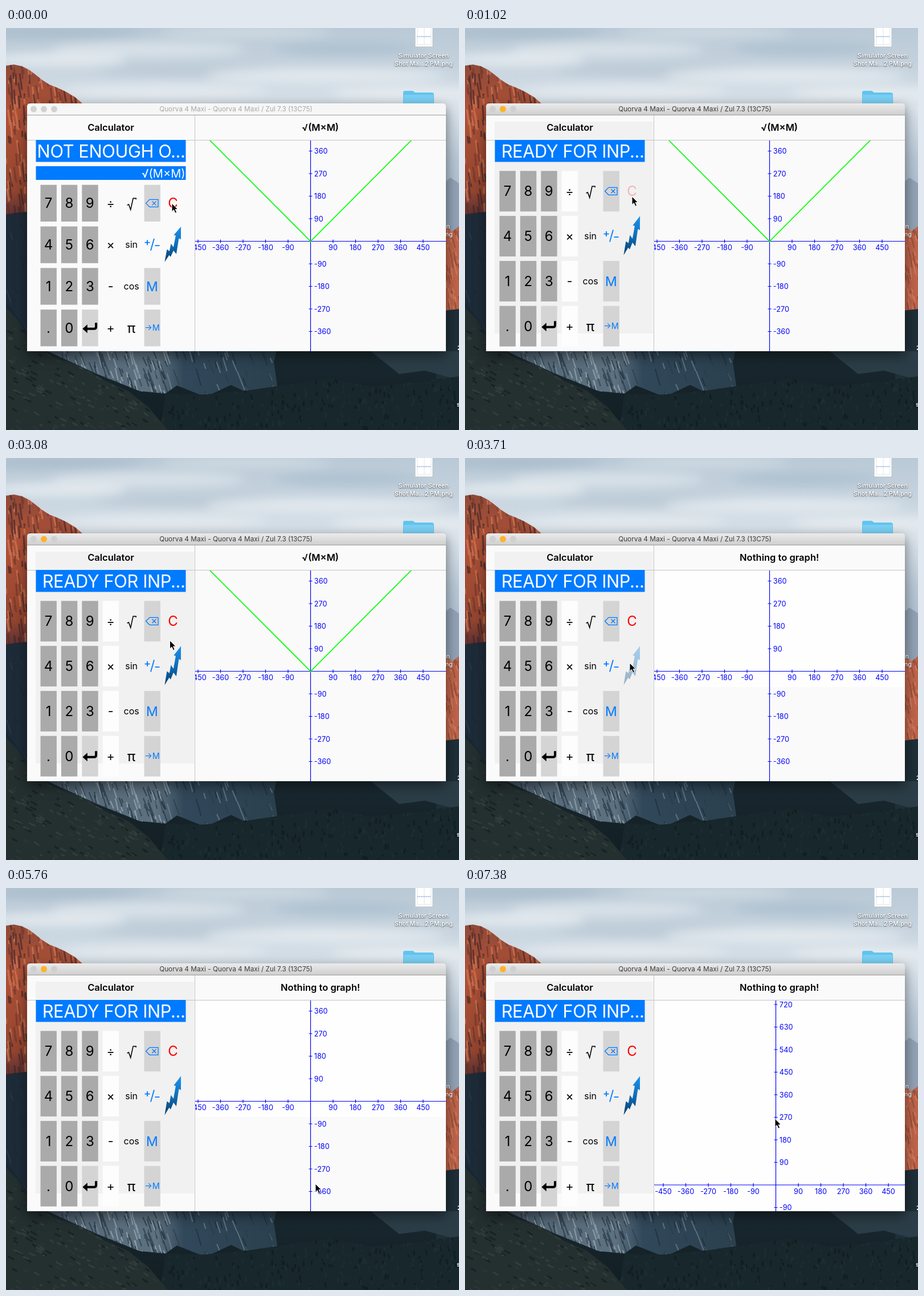
Write an HTML page that moves like this. It is 795x704 px and loops after 8 s.

```html
<!DOCTYPE html>
<html lang="en">
<head>
<meta charset="utf-8">
<title>Graphing calculator</title>
<style>
  html, body { margin: 0; width: 100%; height: 100%; overflow: hidden; background: #17242a; }
  svg { display: block; width: 795px; height: 704px; font-family: Inter, "Open Sans", sans-serif; }
  .window { filter: drop-shadow(0 7px 11px rgba(0, 0, 0, .5)); }
  .desk { fill: #fff; font-size: 10.7px; font-weight: 600; filter: drop-shadow(0 1px 1px rgba(0, 0, 0, .7)); }
  .head { font-size: 16.5px; font-weight: 600; text-anchor: middle; }
  .axis { stroke: #00f; stroke-width: 1.2; fill: none; }
  .ticks { fill: #00f; font-size: 12.7px; }
</style>
</head>
<body>
<svg viewBox="0 0 795 704">
  <defs>
    <linearGradient id="sky" x2="0" y2="1">
      <stop offset="0" stop-color="#b9c9d6"/><stop offset=".1" stop-color="#c6d3de"/>
      <stop offset=".2" stop-color="#dbe4eb"/><stop offset=".32" stop-color="#b9c8d6"/>
      <stop offset=".5" stop-color="#a3b3c5"/>
    </linearGradient>
    <linearGradient id="rock" x2="0" y2="1">
      <stop offset="0" stop-color="#8f4937"/><stop offset=".3" stop-color="#b05238"/>
      <stop offset=".8" stop-color="#94452f"/><stop offset="1" stop-color="#4a2c34"/>
    </linearGradient>
    <linearGradient id="valley" x2="0" y2="1">
      <stop offset="0" stop-color="#20313d"/><stop offset=".6" stop-color="#1b2b32"/>
      <stop offset="1" stop-color="#111d22"/>
    </linearGradient>
    <linearGradient id="cliff">
      <stop offset="0" stop-color="#2c3c49"/><stop offset=".3" stop-color="#566978"/>
      <stop offset=".55" stop-color="#5d7180"/><stop offset=".65" stop-color="#31485a"/>
      <stop offset="1" stop-color="#2a404e"/>
    </linearGradient>
    <linearGradient id="bar" x2="0" y2="1">
      <stop offset="0" stop-color="#ebebeb"/><stop offset="1" stop-color="#cfcfcf"/>
    </linearGradient>
    <linearGradient id="blue" x2="0" y2="1">
      <stop offset="0" stop-color="#1b92ee"/><stop offset=".5" stop-color="#0f6fba"/>
      <stop offset="1" stop-color="#0a3d68"/>
    </linearGradient>
    <filter id="soft" x="-30%" y="-80%" width="160%" height="260%"><feGaussianBlur stdDeviation="9"/></filter>
    <clipPath id="peakClip"><path id="peak" d="M0 66L14 64 28 67 40 73 51 81 62 90 76 99 91 105 106 112 121 121 135 133H184V340H0Z"/></clipPath>
    <clipPath id="cliffClip"><path id="cliffs" d="M0 330L50 320V540L480 540 470 585 478 640 430 642 395 625 350 646 300 626 280 640 235 636 160 606 60 560 0 480Z"/></clipPath>
    <clipPath id="ridgeClip"><path id="ridge" d="M0 490L20 510 40 546 92 580 130 592 174 618 215 636 250 664 284 704H0Z"/></clipPath>
    <clipPath id="woodClip"><path id="wood" d="M280 640L345 642 430 634 510 622 570 614 640 628 700 622 795 610V704H270Z"/></clipPath>
    <clipPath id="eastClip"><path id="east" d="M760 362L774 350 784 356 795 347V492L760 496Z"/></clipPath>
    <clipPath id="plotClip"><rect x="332" y="197" width="440" height="369"/></clipPath>
    <clipPath id="frameClip"><path d="M37 566V138q0-6 6-6H766q6 0 6 6V566Z"/></clipPath>
  </defs>

  <rect width="795" height="704" fill="url(#sky)"/>
  <g filter="url(#soft)">
    <ellipse cx="90" cy="8" rx="150" ry="9" fill="#a9bbca"/>
    <ellipse cx="420" cy="8" rx="150" ry="9" fill="#d0dbe3"/>
    <ellipse cx="250" cy="38" rx="170" ry="13" fill="#d8e1e8"/>
    <ellipse cx="600" cy="36" rx="130" ry="11" fill="#aec1d0"/>
    <ellipse cx="330" cy="74" rx="170" ry="9" fill="#bccad6"/>
    <ellipse cx="90" cy="56" rx="120" ry="12" fill="#e2e9ee"/>
    <ellipse cx="560" cy="84" rx="210" ry="13" fill="#e2e9ee"/>
    <ellipse cx="280" cy="112" rx="180" ry="12" fill="#e3e9ee"/>
    <ellipse cx="720" cy="116" rx="150" ry="12" fill="#e6ecf0"/>
  </g>
  <path d="M755 282L780 262 795 272V370H755Z" fill="#92a2b5"/>
  <path d="M0 320L60 300V540H795V704H0Z" fill="url(#valley)"/>
  <path d="M755 490L795 488V704H755Z" fill="#1f2f38"/>
  <path d="M640 566H795V616L735 600 690 606Z" fill="#2b3d47"/>
  <use href="#peak" fill="url(#rock)"/><g id="peakMarks" clip-path="url(#peakClip)"></g>
  <use href="#east" fill="#c0644a"/><g id="eastMarks" clip-path="url(#eastClip)"></g>
  <use href="#cliffs" fill="url(#cliff)"/><g id="cliffMarks" clip-path="url(#cliffClip)"></g>
  <path d="M0 326L50 320V540L0 490Z" fill="#172532" opacity=".75"/>
  <use href="#wood" fill="#18272b"/><g id="woodMarks" clip-path="url(#woodClip)"></g>
  <use href="#ridge" fill="#242f30"/><g id="ridgeMarks" clip-path="url(#ridgeClip)"></g>

  <path d="M718 0V33H749V0" fill="#fff" stroke="#b9c0c6"/>
  <path d="M722 0V29H746V0M734 0V29" fill="none" stroke="#e0e4e8"/>
  <path d="M722 15H746" stroke="#4a86d8" stroke-dasharray="2 1"/>
  <path d="M697 135V113q0-3 3-3H714l4 3H747q4 0 4 4V135Z" fill="#62c5ef"/>
  <path d="M698 117H750V135H698Z" fill="#7bd2f6"/>
  <g class="desk">
    <text x="733" y="52" text-anchor="middle">Simulator Screen</text>
    <text x="733" y="66" text-anchor="middle">Shot Ma...2 PM.png</text>
    <text x="779" y="351" text-anchor="end">n</text>
    <text x="784" y="365" text-anchor="end">ng</text>
    <text x="792" y="564">2</text>
    <text x="791" y="663">s</text>
  </g>

  <g class="window"><path d="M37 566V138q0-6 6-6H766q6 0 6 6V566Z" fill="#fafafa"/></g>
  <g clip-path="url(#frameClip)">
    <rect id="titleBar" x="37" y="132" width="735" height="20"/>
    <circle class="light" cx="48.5" cy="142" r="5.5"/>
    <circle id="amber" cx="66.5" cy="142" r="5.5"/>
    <circle class="light" cx="84.5" cy="142" r="5.5"/>
    <text id="title" x="403.5" y="146.3" font-size="11.8" text-anchor="middle">Quorva 4 Maxi - Quorva 4 Maxi / Zul 7.3 (13C75)</text>
    <path d="M37 152.5H772" stroke="#9c9c9c"/>
    <path id="panel" d="M52 164H285V277H330V535H52Z" fill="#f1f1f1"/>
    <path id="notch" d="M285 164H330V277H285Z" fill="#f1f1f1"/>
    <rect id="glow" x="332" y="197" width="440" fill="#fefefe"/>
    <path d="M37 196.5H772M331.5 153V566" stroke="#c4c4c4"/>
    <text class="head" x="184" y="180">Calculator</text>
    <text class="head" id="graphTitle" x="551.7" y="180"></text>
    <rect x="52.5" y="196" width="263" height="38.5" fill="#007aff"/>
    <text id="display" x="314.5" y="227" font-size="30.8" letter-spacing="-.4" fill="#fff" text-anchor="end"></text>
    <g id="formula">
      <rect x="52.5" y="242" width="263" height="24" fill="#007aff"/>
      <text x="314.5" y="261.5" font-size="20" fill="#fff" text-anchor="end">√(M×M)</text>
    </g>
    <g id="keys"></g>
    <g clip-path="url(#plotClip)">
      <g id="axes"><path class="axis" id="grid"/><g class="ticks" id="labels"></g></g>
      <path id="curve" d="M355.5 194.5L534.5 373.5 713.5 194.5" fill="none" stroke="#0f0" stroke-width="1.6"/>
    </g>
  </g>
  <path id="cursor" d="M0 0V14.5L3.4 11.4 6 17.2 8.6 16 6.1 10.5H10.6Z" fill="#000" stroke="#fff"/>
</svg>
<script>
const LOOP = 8000;
const $ = id => document.getElementById(id);

function add(parent, tag, attrs, text = "") {
  const node = document.createElementNS("http://www.w3.org/2000/svg", tag);
  for (const k in attrs) node.setAttribute(k, attrs[k]);
  node.textContent = text;
  return parent.appendChild(node);
}

// Seeded strokes give the landscape its grain.
let seed = 7;
const rand = () => (seed = seed * 16807 % 2147483647) / 2147483647;
function grain(id, count, [x, y, w, h], [dx, dy], colors, width) {
  for (const color of colors) {
    let d = "";
    for (let i = 0; i < count; i++) {
      const len = .3 + rand();
      d += `M${(x + rand() * w).toFixed(1)} ${(y + rand() * h).toFixed(1)}` +
           `l${(dx * len + rand() * 4 - 2).toFixed(1)} ${(dy * len).toFixed(1)}`;
    }
    add($(id), "path", { d, stroke: color, "stroke-width": width, opacity: .6 });
  }
}
grain("peakMarks", 90, [0, 62, 140, 270], [3, 26], ["#d9805a", "#3a2327", "#6b352c"], 3);
grain("eastMarks", 20, [772, 345, 23, 150], [3, 14], ["#e08e6c", "#7c4338"], 2);
grain("cliffMarks", 110, [0, 340, 480, 300], [9, 26], ["#7d909f", "#1b2a34", "#283947"], 2);
grain("cliffMarks", 60, [100, 560, 180, 80], [7, 22], ["#a9b5be", "#1f2e38"], 2.2);
grain("woodMarks", 190, [270, 590, 525, 114], [0, 8], ["#0e191c", "#20323a", "#1a2a30"], 3);
grain("ridgeMarks", 130, [0, 486, 300, 218], [9, 5], ["#121b1d", "#3d4944", "#303b39"], 3);

const keys = [];
function key(col, row, fill, label, size = 24, color = "#000") {
  const rect = add($("keys"), "rect", { x: 60.5 + col * 36.4, width: 28.4, fill });
  const body = add($("keys"), "g", {});
  if (label) add(body, "text", { y: size * .36, "font-size": size, fill: color, "text-anchor": "middle" }, label);
  const item = { col, row, rect, body };
  keys.push(item);
  return item;
}
const outline = (item, d, stroke, width) =>
  add(item.body, "path", { d, stroke, "stroke-width": width, fill: "none" });

const DARK = "#aaa", PALE = "#d4d4d4", BLUE = "#007aff";
["789", "456", "123", ".0"].forEach((digits, row) =>
  [...digits].forEach((digit, col) => key(col, row, DARK, digit)));
const ops = ["÷", "×", "-", "+"].map((op, row) => key(3, row, "none", op, 21.5));
key(4, 1, "none", "sin", 16);
key(4, 2, "none", "cos", 16);
key(4, 3, "none", "π", 24);
key(5, 2, PALE, "M", 23, BLUE);
key(5, 3, PALE, "→M", 14.5, BLUE);
const clear = key(6, 0, "none", "C", 24, "#f00");

outline(key(4, 0, "none"), "M-7.5 3.5L-4.8 2-1.4 11.3 3-8.6H8V-6.5", "#000", 1.6);
outline(key(5, 0, PALE), "M-11 0L-4.5-6.5H10.5V6.5H-4.5ZM0-3.5L7 3.5M7-3.5L0 3.5", BLUE, 1.3);
outline(key(5, 1, "none"), "M-13-4H-4M-8.5-8.5V.5M-2.5 10L3.5-11M5 1.5H13", BLUE, 1.8);
const enter = key(2, 3, PALE);
outline(enter, "M10.8-9V-2Q10.8 1.5 7 1.5H-6", "#000", 4);
add(enter.body, "path", { d: "M-13 1.5L-4.5-6V9Z" });
const bolt = key(6, 1, "none");
const boltShape = add(bolt.body, "path", { fill: "url(#blue)",
  d: "M14.2-32L1.5-17 5-16.5 1 4-3.5-2-6 11-10.5 8-14.5 30-6.5 18-4 21 1 10 6 16 10.5-11.5 14-9.5Z" });

const grid = $("grid"), unit = 39.5;
let d = "M-500 0H500M0-600V600";
for (let i = -8; i <= 8; i++) {
  if (!i) continue;
  const at = i * unit;
  if (Math.abs(i) < 6) {
    d += `M${at}-3V3`;
    add($("labels"), "text", { x: at, y: 15.7, "text-anchor": "middle" }, i * 90);
  }
  d += `M-3 ${-at}H3`;
  add($("labels"), "text", { x: 6.3, y: 4.6 - at }, i * 90);
}
grid.setAttribute("d", d);

// Pointer moves: start, end, steps, target x, target y
const moves = [
  [80, 80, 1, 292, 306],
  [680, 1020, 4, 293, 295],
  [1110, 1460, 5, 423, 352],
  [1570, 2110, 7, 340, 367],
  [2290, 2290, 1, 327, 324],
  [2380, 2470, 2, 287, 283],
  [2650, 3440, 10, 288, 356],
  [3530, 3530, 1, 289, 359],
  [3800, 4160, 5, 560, 334],
  [5060, 5760, 9, 543, 518],
  [6390, 6770, 5, 542, 474],
  [6950, 7030, 2, 541, 336],
  [7210, 7380, 3, 544, 404]
];
function pointer(t) {
  let x = 291, y = 307;
  for (const [start, end, steps, tx, ty] of moves) {
    if (t < start) break;
    const p = end > start ? Math.min(1, (Math.floor((t - start) / (end - start) * (steps - 1) + 1e-6) + 1) / steps) : 1;
    x += (tx - x) * p;
    y += (ty - y) * p;
  }
  return [x, y];
}

const set = (node, name, value) => node.setAttribute(name, value);
const show = (node, on) => set(node, "visibility", on ? "visible" : "hidden");
const lights = document.querySelectorAll(".light");

function render(t) {
  const active = t >= 320, ready = t >= 410, empty = t >= 3620, moved = t >= 6210;

  set($("titleBar"), "fill", active ? "url(#bar)" : "#f6f6f6");
  set($("title"), "fill", active ? "#3c3c3c" : "#a9a9a9");
  set($("amber"), "fill", active ? "#fdb32b" : "#d2d2d2");
  lights.forEach(light => set(light, "fill", active ? "#d0d0d0" : "#d2d2d2"));

  show($("panel"), ready);
  show($("notch"), ready && (t < 1460 || t >= 2650));
  show($("formula"), !ready);
  $("display").textContent = ready ? "READY FOR INP..." : "NOT ENOUGH O...";
  const top = ready ? 250.3 : 274.7, step = ready ? 78.8 : 72.8, height = ready ? 71 : 64.3;
  for (const { col, row, rect, body } of keys) {
    const y = top + row * step;
    set(rect, "y", y);
    set(rect, "height", height);
    set(body, "transform", `translate(${74.5 + col * 36.4} ${y + height / 2})`);
  }
  ops.forEach(op => set(op.rect, "fill", ready ? "#fdfdfd" : "none"));
  set(boltShape, "transform", `scale(1 ${height / 64.3})`);
  set(clear.body, "opacity", ready && t < 1110 ? .25 : ready && t < 1200 ? .65 : 1);
  set(bolt.body, "opacity", t >= 3530 && t < 3890 ? .36 : 1);

  $("graphTitle").textContent = empty ? "Nothing to graph!" : "√(M×M)";
  show($("curve"), !empty);
  set($("glow"), "height", moved ? 369 : empty ? 204 : 0);
  set($("axes"), "transform", moved ? "translate(545.5 520)" : "translate(534.5 373.5)");
  set($("cursor"), "transform", `translate(${pointer(t)})`);
}

function tick(now) {
  render(now % LOOP);
  requestAnimationFrame(tick);
}
render(0);
requestAnimationFrame(tick);
</script>
</body>
</html>
```
